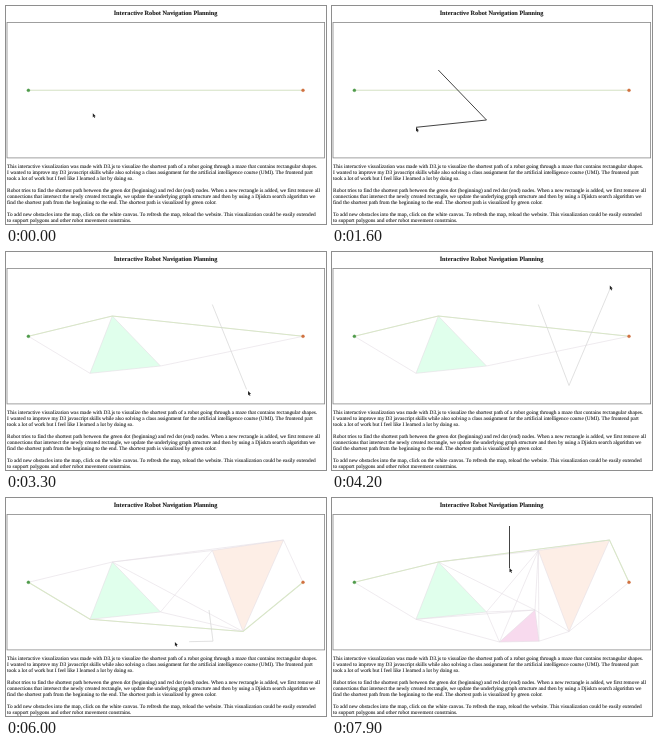
An HTML page with a canvas that plays this animation: 320x218 px, repeating every 8 s.

```html
<!DOCTYPE html>
<html lang="en">
<head>
<meta charset="utf-8">
<title>Interactive Robot Navigation Planning</title>
<style>
  html, body { margin: 0; width: 100%; height: 100%; overflow: hidden; background: #fff; }
  canvas, svg { position: absolute; left: 0; top: 0; width: 320px; height: 218px; }
  text {
    font: 5.333px "Liberation Serif", "Times New Roman", serif;
    text-rendering: geometricPrecision;
    fill: #1c1c1c; stroke: #1c1c1c; stroke-width: 0.08px;
  }
  .title { font-size: 6.29px; font-weight: bold; text-anchor: middle; }
</style>
</head>
<body>
<canvas id="stage"></canvas>
<svg viewBox="0 0 320 218">
  <text class="title" x="159.6" y="8.6">Interactive Robot Navigation Planning</text>
  <text y="162">
    <tspan x="1.1">This interactive visualization was made with D3.js to visualize the shortest path of a robot going through a maze that contains rectangular shapes.</tspan>
    <tspan x="1.1" dy="6.1">I wanted to improve my D3 javascript skills while also solving a class assignment for the artificial intelligence course (UMI). The frontend part</tspan>
    <tspan x="1.1" dy="6.1">took a lot of work but I feel like I learned a lot by doing so.</tspan>
  </text>
  <text y="186">
    <tspan x="1.1">Robot tries to find the shortest path between the green dot (beginning) and red dot (end) nodes. When a new rectangle is added, we first remove all</tspan>
    <tspan x="1.1" dy="6.1">connections that intersect the newly created rectangle, we update the underlying graph structure and then by using a Djiskra search algorithm we</tspan>
    <tspan x="1.1" dy="6.1">find the shortest path from the beginning to the end. The shortest path is visualized by green color.</tspan>
  </text>
  <text y="210">
    <tspan x="1.1">To add new obstacles into the map, click on the white canvas. To refresh the map, reload the website. This visualization could be easily extended</tspan>
    <tspan x="1.1" dy="6.1">to support polygons and other robot movement constrains.</tspan>
  </text>
</svg>
<script>
const LOOP = 8000, STEP = 100;
const start = { x: 22.4, y: 84.3 }, goal = { x: 297, y: 84.3 };

// A place the pointer sets off for at `leave` and clicks at `click`.
const stop = (x, y, leave, click) => ({ x, y, leave, click });

const obstacles = [
  { fill: '#e0ffec', pts: [stop(106.3, 64, 400, 900), stop(154.5, 114, 900, 1300), stop(84, 121.3, 1300, 1600)] },
  { fill: '#fdeee6', pts: [stop(206.3, 52.5, 1900, 2400), stop(237, 133.5, 2500, 3500), stop(277.5, 42, 3500, 4400)] },
  { fill: '#f8daee', pts: [stop(203, 112, 4800, 5300), stop(207, 143.2, 5300, 5700), stop(167.5, 144, 5700, 6300)] },
  { fill: 'none', pts: [stop(177.5, 28, 6800, 7400)] }
];
obstacles.forEach(o => { o.done = o.pts[2] ? o.pts[2].click + STEP : Infinity; });

const stops = [
  stop(86.8, 107.2, -1, 0), stop(89.3, 102, 0, 200),
  ...obstacles.flatMap(o => o.pts),
  stop(177.5, 70, 7400, 7800)
];

const smooth = u => u * u * u * (u * (6 * u - 15) + 10);

// Quick reach, then a small sideways overshoot before settling.
function pointerAt(t) {
  const i = Math.max(1, stops.filter(s => s.leave <= t).length - 1);
  const a = stops[i - 1], b = stops[i];
  const k = Math.min(1, (t - b.leave) / (b.click - b.leave));
  const reach = smooth(Math.min(1, k / 0.6));
  const over = 0.08 * Math.sin(Math.PI * Math.max(0, k - 0.6) / 0.4);
  const dx = b.x - a.x, dy = b.y - a.y;
  return {
    x: a.x + dx * reach + over * (dx + 0.4 * dy),
    y: a.y + dy * reach + over * (dy - 0.4 * dx)
  };
}

const side = (a, b, c) => (b.x - a.x) * (c.y - a.y) - (b.y - a.y) * (c.x - a.x);
const dist = (a, b) => Math.hypot(a.x - b.x, a.y - b.y);

function crosses(a, b, c, d) {
  if (a === c || a === d || b === c || b === d) return false;
  return side(a, b, c) * side(a, b, d) < 0 && side(c, d, a) * side(c, d, b) < 0;
}

// Visibility graph and shortest route around the given shapes.
function plan(shapes) {
  const nodes = [start, goal, ...shapes.flatMap(s => s.pts)];
  const walls = shapes.flatMap(s => s.pts.map((p, i) => [p, s.pts[(i + 1) % s.pts.length]]));
  const edges = [];
  nodes.forEach((a, i) => nodes.slice(i + 1).forEach(b => {
    if (!walls.some(w => crosses(a, b, ...w))) edges.push([a, b]);
  }));
  const cost = new Map(nodes.map(n => [n, Infinity])), prev = new Map();
  cost.set(start, 0);
  const relax = (a, b) => {
    const c = cost.get(a) + dist(a, b);
    if (c < cost.get(b)) { cost.set(b, c); prev.set(b, a); }
  };
  nodes.forEach(() => edges.forEach(([a, b]) => { relax(a, b); relax(b, a); }));
  const route = [];
  for (let n = goal; n; n = prev.get(n)) route.push(n);
  return { edges, route };
}

const plans = [0, 1, 2, 3].map(n => plan(obstacles.slice(0, n)));

const canvas = document.getElementById('stage');
const ctx = canvas.getContext('2d');
const ratio = window.devicePixelRatio || 1;
canvas.width = 320 * ratio;
canvas.height = 218 * ratio;

function trace(pts) {
  ctx.beginPath();
  pts.forEach(p => ctx.lineTo(p.x, p.y));
}

function line(pts, color, width) {
  trace(pts);
  ctx.strokeStyle = color;
  ctx.lineWidth = width;
  ctx.stroke();
}

function dot({ x, y }, color) {
  ctx.beginPath();
  ctx.arc(x, y, 1.5, 0, Math.PI * 2);
  ctx.fillStyle = ctx.strokeStyle = color;
  ctx.fill();
  ctx.globalAlpha = 0.35;
  ctx.lineWidth = 0.9;
  ctx.stroke();
  ctx.globalAlpha = 1;
}

const arrow = new Path2D('M0 0V4.2L1 3.4L1.7 4.9L2.4 4.6L1.7 3.1H3Z');

function drawPointer({ x, y }) {
  ctx.save();
  ctx.translate(x, y);
  ctx.fillStyle = '#222';
  ctx.fill(arrow);
  ctx.restore();
}

function drawDraft({ pts }, t) {
  const placed = pts.filter(p => p.click <= t);
  if (!placed.length) return;
  const from = placed[placed.length - 1];
  const end = pointerAt(Math.max(from.click, t - STEP));
  // Upright lines stay crisp, slanted ones come out pale.
  const upright = Math.abs(end.x - from.x) < 1.5;
  line([...placed, end], upright ? '#444' : '#d4d4d4', upright ? 1 : 0.7);
}

function draw(t) {
  ctx.setTransform(ratio, 0, 0, ratio, 0, 0);
  ctx.fillStyle = '#fff';
  ctx.fillRect(0, 0, 320, 218);
  ctx.strokeStyle = '#888';
  ctx.lineWidth = 0.8;
  ctx.strokeRect(1, 16.4, 317.6, 135.5);

  const closed = obstacles.filter(o => o.done <= t);
  const { edges, route } = plans[closed.length];
  closed.forEach(o => {
    trace(o.pts);
    ctx.fillStyle = o.fill;
    ctx.fill();
  });
  edges.forEach(e => line(e, '#e4dde4', 0.6));
  line(route, '#d9e7c8', 1.1);
  dot(start, '#4f9a4a');
  dot(goal, '#d0703f');

  obstacles.filter(o => o.done > t).forEach(o => drawDraft(o, t));
  drawPointer(pointerAt(t));
}

const t0 = performance.now();
function tick() {
  const t = (performance.now() - t0) % LOOP;
  draw(Math.floor(t / STEP) * STEP);
  requestAnimationFrame(tick);
}
tick();
</script>
</body>
</html>
```
